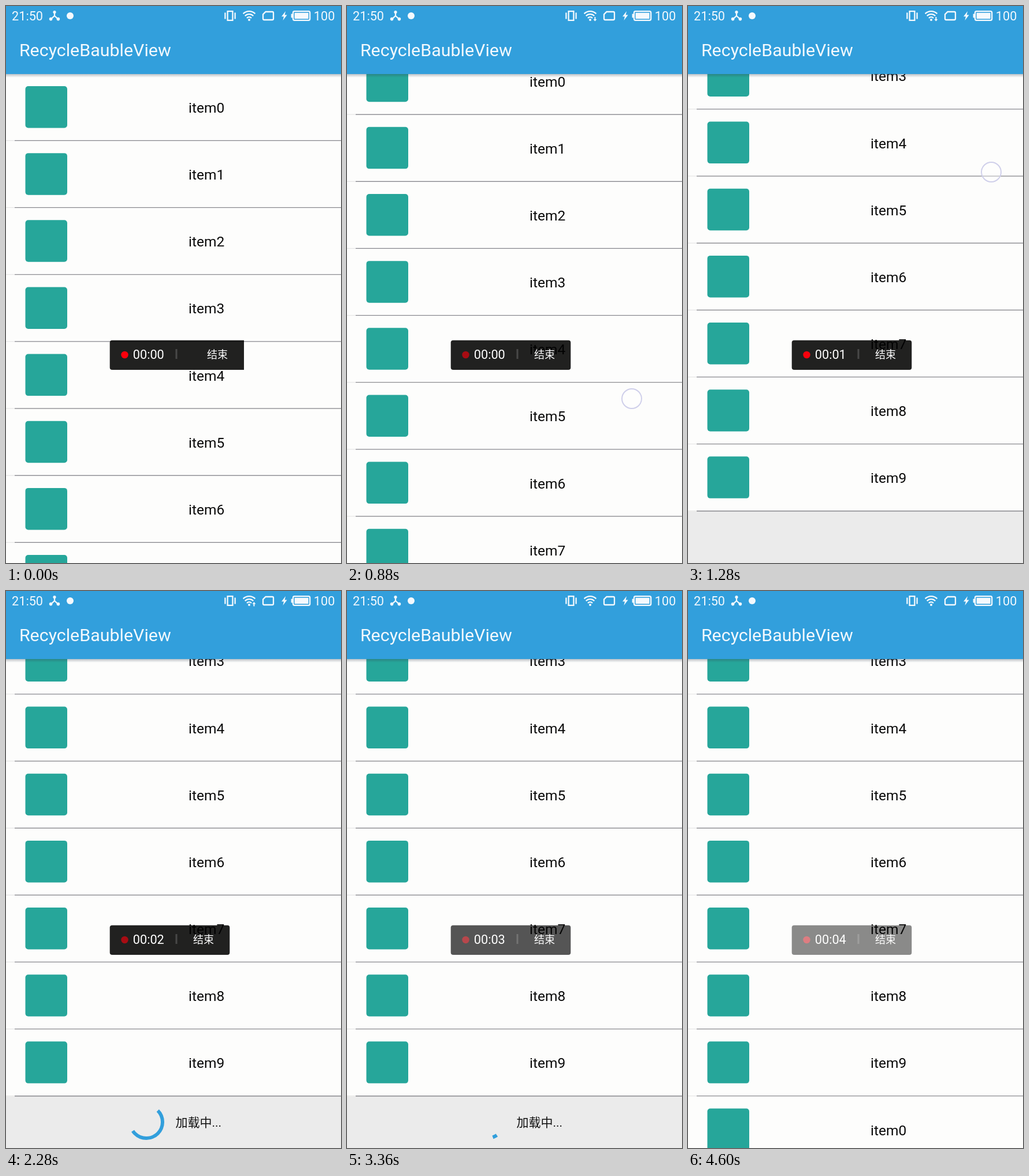
These frames come from a looping animation (580x966 px, 4640 ms). An HTML page:

```html
<!DOCTYPE html>
<html lang="zh-CN">
<head>
<meta charset="utf-8">
<title>RecycleBaubleView</title>
<style>
  html, body { margin: 0; width: 100%; height: 100%; overflow: hidden; background: #fdfdfc; }
  svg { display: block; }
  text { font-family: Roboto, "Noto Sans CJK SC", "Noto Sans CJK", sans-serif; }
  .row text { font-size: 24.5px; fill: #0a0a0a; }
  .line { fill: none; stroke: #f4f9fd; stroke-width: 2.3; }
  .solid { fill: #f4f9fd; }
</style>
</head>
<body>
<svg width="580" height="966" viewBox="0 0 580 966">
  <defs>
    <linearGradient id="shade" x2="0" y2="1">
      <stop offset="0" stop-color="#345" stop-opacity=".32"/>
      <stop offset="1" stop-color="#345" stop-opacity="0"/>
    </linearGradient>
  </defs>
  <rect width="580" height="966" fill="#fdfdfc"/>

  <g id="list">
    <g id="footer">
      <rect y="1279.6" width="580" height="90" fill="#ebebeb"/>
      <g id="loading">
        <circle id="arc" cx="243" cy="1324" r="28" fill="none" stroke="#329fdc" stroke-width="6" pathLength="360"/>
        <text x="293.5" y="1331.5" font-size="21" fill="#111">加载中...</text>
      </g>
    </g>
  </g>

  <rect y="118" width="580" height="6" fill="url(#shade)"/>
  <rect width="580" height="118" fill="#329fdc"/>
  <g class="solid">
    <text x="10" y="24.7" font-size="21.7">21:50</text>
    <text x="532.8" y="24.7" font-size="21.7">100</text>
    <text x="22.9" y="87.3" font-size="30.4">RecycleBaubleView</text>
  </g>

  <!-- status icons -->
  <path class="line" d="M84 11V17L78 22.5M84 17L90 22.5"/>
  <g class="solid">
    <circle cx="84" cy="10.5" r="2.6"/><circle cx="77.6" cy="22.6" r="2.8"/><circle cx="90.4" cy="22.6" r="2.8"/>
    <circle cx="111" cy="17" r="6"/>
  </g>
  <path class="line" d="M383.6 9.2H392.4V24.8H383.6ZM379.4 11.5V22.5M396.6 11.5V22.5"/>
  <path class="line" d="M410.6 13.4A14.8 14.8 0 0 1 431.4 13.4M413.8 17.2A10 10 0 0 1 428.2 17.2M417 20.9A5.4 5.4 0 0 1 425 20.9"/>
  <circle class="solid" cx="421" cy="24" r="2"/>
  <path id="down" class="solid" d="M428.4 19H430.4V23H432.4L429.4 26.4L426.4 23H428.4Z"/>
  <path id="up" class="solid" d="M428.4 26.4H430.4V22.4H432.4L429.4 19L426.4 22.4H428.4Z"/>
  <path class="line" d="M449.5 10H461Q463 10 463 12V22Q463 24 461 24H447Q445 24 445 22V14.5Z"/>
  <path class="solid" d="M484 9L477 18.3H481L479.4 25L486.6 15.4H482.6Z"/>
  <rect class="line" x="497" y="9.2" width="29.2" height="15.6" rx="2.5"/>
  <rect class="solid" x="499.6" y="11.8" width="24" height="10.4"/>
  <rect class="solid" x="493.6" y="13.5" width="2.6" height="7" rx="1"/>

  <g id="bar">
    <path id="panel" fill="#000" fill-opacity=".87"/>
    <circle id="dot" cx="205.5" cy="605" r="6.2" fill="#ff000c"/>
    <text id="clock" x="219.8" y="612.2" font-size="21.7" fill="#fff"></text>
    <rect x="293.5" y="595" width="3" height="17" fill="#484848"/>
    <text id="stop" y="610.8" font-size="18" fill="#fff">结束</text>
  </g>

  <circle id="touch" r="17" fill="#fff" fill-opacity=".35" stroke="#cfcfea" stroke-width="2"/>
</svg>

<script>
const LOOP = 4640, STEP = 40, PITCH = 116.15;
const LOAD_START = 1480, LOAD_END = 3480;
const $ = id => document.getElementById(id);
const show = (id, on) => $(id).setAttribute('display', on ? 'inline' : 'none');
const set = (id, attrs) => {
  for (const k in attrs) $(id).setAttribute(k, attrs[k]);
};
const clamp = x => Math.max(0, Math.min(1, x));
const ease = x => (1 - Math.cos(Math.PI * clamp(x))) / 2;

// points: [time, value], linear in between
function track(points, t) {
  let [t0, v0] = points[0];
  for (const [t1, v1] of points) {
    if (t < t1) return t1 === t0 ? v0 : v0 + (v1 - v0) * clamp((t - t0) / (t1 - t0));
    [t0, v0] = [t1, v1];
  }
  return v0;
}

const scroll = [[790, 0], [880, 45.3], [980, 121], [1080, 209.4], [1160, 301], [1240, 403]];
const touchX = [[720, 497], [880, 493], [1080, 491], [1180, 502], [1280, 525]];
const touchY = [[720, 740], [800, 726], [880, 681], [980, 609], [1080, 525], [1180, 411], [1280, 288]];

function row(i) {
  const y = i * PITCH;
  return `<g class="row" id="row${i}">
    <rect x="0" y="${y + 118}" width="580" height="${PITCH}" fill="#fdfdfc"/>
    <rect x="0" y="${y + 232.8}" width="15" height="1.4" fill="#e6e6e6"/>
    <rect x="15" y="${y + 232.8}" width="565" height="1.5" fill="#84848a"/>
    <rect x="33.5" y="${y + 139}" width="72.5" height="72.5" rx="5" fill="#26a69a"/>
    <text x="316" y="${y + 185}">item${i % 10}</text>
  </g>`;
}
$('list').insertAdjacentHTML('beforeend', Array.from({ length: 11 }, (_, i) => row(i)).join(''));

function panel(right, r) {
  return `M184 579.7H${right - r}q${r} 0 ${r} ${r}V${631 - r}q0 ${r} ${-r} ${r}H184q-4.3 0 -4.3 -4V583.7q0 -4 4.3 -4Z`;
}

function spin(t) {
  const GROW = 460, REST = 220, SPAN = 254;
  const age = t - 1992, cycle = 2 * (GROW + REST);
  const turn = Math.floor(age / cycle), p = age - turn * cycle;
  const head = SPAN * ease(p / GROW);
  const tail = SPAN * ease((p - GROW - REST) / GROW);
  const sweep = 16 + head - tail;
  const start = 315 + 0.19 * (t - 2280) + SPAN * turn + tail;
  set('arc', {
    'stroke-dasharray': `${sweep} ${360 - sweep}`,
    transform: `rotate(${start % 360} 243 1324)`
  });
}

function draw(t) {
  set('list', { transform: `translate(0 ${-track(scroll, t)})` });
  show('loading', t >= LOAD_START);
  show('footer', t < LOAD_END);
  show('row10', t >= LOAD_END);
  spin(t);

  show('touch', t >= 720 && t <= 1280);
  set('touch', { cx: track(touchX, t), cy: track(touchY, t) });
  show('down', t >= 720 && t < 2280);
  show('up', t >= 2280 && t < 2760);

  const wide = t < STEP;
  set('panel', { d: wide ? panel(412, 0) : panel(387.3, 4) });
  set('stop', { x: wide ? 348 : 324 });
  set('bar', { opacity: 1 - 0.48 * ease((t - 3210) / 300) });
  set('dot', { opacity: 0.77 + 0.23 * Math.cos(2 * Math.PI * t / 1400) });
  $('clock').textContent = '00:0' + Math.max(0, Math.floor((t - 200) / 1000));
}

const origin = performance.now();
function tick() {
  const t = (performance.now() - origin) % LOOP;
  draw(Math.floor(t / STEP) * STEP);
  requestAnimationFrame(tick);
}
draw(0);
requestAnimationFrame(tick);
</script>
</body>
</html>
```
